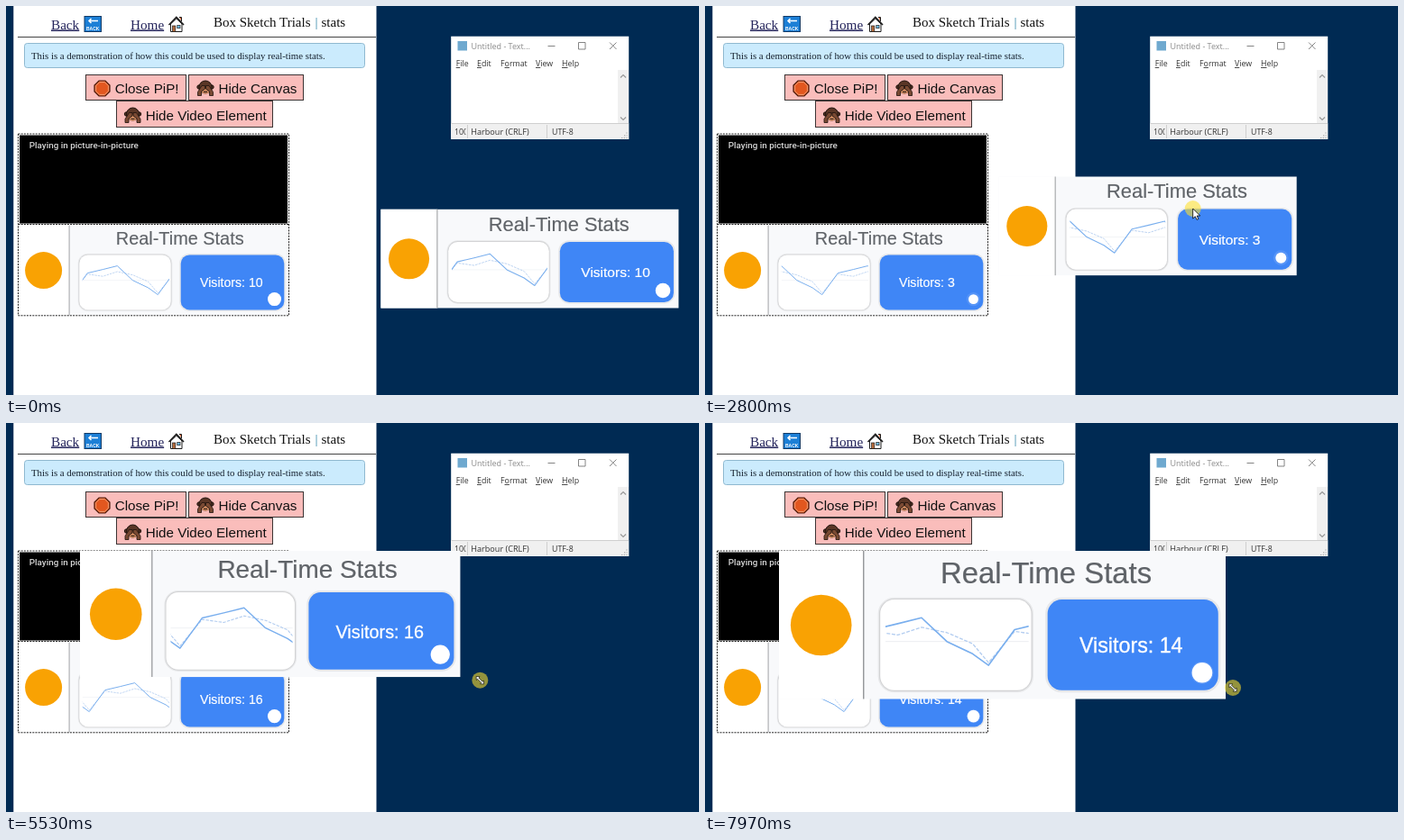
Write an HTML page that moves like this. It is 768 by 432 pixels and loops after 8 s.

```html
<!DOCTYPE html>
<html lang="en">
<head>
<meta charset="utf-8">
<title>Real-time stats</title>
<style>
  html, body { margin: 0; width: 100%; height: 100%; overflow: hidden; background: #002a53; }
  svg { display: block; width: 100%; height: 100%; }
  .serif { font-family: "Liberation Serif", serif; font-size: 15.2px; }
  .sans { font-family: "Liberation Sans", sans-serif; }
  .ui { font-family: "Open Sans", sans-serif; font-size: 8.8px; fill: #333; }
  .btn rect { fill: #fabdbb; stroke: #3c3434; }
  .btn text { font-size: 15.2px; fill: #111; }
  .dash { fill: none; stroke: #222; stroke-dasharray: 2 1.2; }
</style>
</head>
<body>
<svg viewBox="0 0 768 432" xmlns="http://www.w3.org/2000/svg">
  <defs>
    <clipPath id="plot"><rect x="71.5" y="35" width="96.2" height="56"/></clipPath>
    <clipPath id="count"><rect x="494" y="131" width="15.5" height="16"/></clipPath>

    <g id="panel">
      <rect width="300" height="99.7" fill="#f8f9fb"/>
      <rect width="57" height="99.7" fill="#fff"/>
      <path d="M56.8 0V99.7" stroke="#96989b" stroke-width=".9"/>
      <circle cx="28.3" cy="50" r="20.5" fill="#f9a203"/>
      <text class="sans" x="179.4" y="21.7" font-size="19.9" text-anchor="middle" fill="#5f6368" stroke="#5f6368" stroke-width=".15">Real-Time Stats</text>
      <g fill="none" stroke="#555">
        <rect x="68" y="32.8" width="101.4" height="61" rx="9.5" stroke-width="3" opacity=".1"/>
        <rect x="68" y="32.8" width="101.4" height="61" rx="9.5" stroke-width="1.4" opacity=".14"/>
        <rect x="180.4" y="32.8" width="114.6" height="61" rx="9.5" stroke-width="3" opacity=".1"/>
      </g>
      <rect x="68" y="32.8" width="101.4" height="61" rx="9.5" fill="#fff"/>
      <rect x="180.4" y="32.8" width="114.6" height="61" rx="9.5" fill="#3f86f6"/>
      <g clip-path="url(#plot)" fill="none" stroke-linejoin="round">
        <path d="M71 61H168" stroke="#eceef1" stroke-width=".6"/>
        <polyline id="past" stroke="#b3cdf0" stroke-width=".8" stroke-dasharray="2.4 1"/>
        <polyline id="live" stroke="#7aafee" stroke-width="1"/>
      </g>
      <text class="sans" id="visitors" x="201.8" y="68.7" font-size="14.1" fill="#fff" stroke="#fff" stroke-width=".22"></text>
      <circle cx="284.2" cy="82" r="7.6" fill="#fff" opacity=".12"/>
      <circle id="pulse" cx="284.2" cy="82" r="7" fill="#fff"/>
    </g>

    <g id="monkey">
      <g fill="#5a3626" stroke="#1f130e">
        <circle cx="-7" cy="-1" r="2.2"/><circle cx="7" cy="-1" r="2.2"/>
        <circle cy="-1" r="7"/>
      </g>
      <ellipse cy="3" rx="4.6" ry="3.4" fill="#cf8a60"/>
      <path d="M-2 4.4H2" stroke="#1f130e"/>
      <path d="M-8.5 8.5V4.5L-4 -2.5H-.5V1L-4.5 4V8.5ZM8.5 8.5V4.5L4 -2.5H.5V1L4.5 4V8.5Z" fill="#7a4a33" stroke="#1f130e" stroke-width=".8"/>
    </g>
  </defs>

  <rect width="768" height="432" fill="#002a53"/>
  <rect x="8.3" width="402.2" height="432" fill="#fff"/>

  <g class="serif" fill="#25255c">
    <text x="50" y="25.5" text-decoration="underline">Back</text>
    <text x="138" y="25.5" text-decoration="underline">Home</text>
    <text x="230" y="22.5" fill="#111" font-size="15">Box Sketch Trials</text>
    <text x="342.5" y="22.5" fill="#2f86a8">|</text>
    <text x="349.5" y="22.5" fill="#111" font-size="15">stats</text>
  </g>
  <g>
    <rect x="87" y="11.5" width="18.5" height="17" fill="#1c7fd6" stroke="#123a66"/>
    <path d="M92 16.5H102M94.5 14L92 16.5L94.5 19" fill="none" stroke="#fff" stroke-width="1.5"/>
    <text class="sans" x="96.2" y="26.5" font-size="5" font-weight="bold" text-anchor="middle" fill="#fff">BACK</text>
  </g>
  <g stroke="#1c1c1c">
    <path d="M182.5 20V28.5H195V20L188.8 14Z" fill="#fff"/>
    <path d="M192 12.5H194.5V17" fill="#d9683c"/>
    <path d="M180.5 21L188.8 12.5L197 21" fill="none" stroke-width="1.6"/>
    <rect x="184.6" y="22" width="3.2" height="6.5" fill="#b56a3a" stroke-width=".7"/>
    <rect x="189.8" y="21.5" width="3.2" height="3.2" fill="#6fc0ee" stroke-width=".7"/>
  </g>
  <path d="M13 34.5H410" stroke="#444"/>
  <rect x="20.5" y="41.5" width="377" height="27" rx="3" fill="#cbebfd" stroke="#8fb9d0"/>
  <text class="serif" x="28" y="59" style="font-size:10.8px" fill="#15202c">This is a demonstration of how this could be used to display real-time stats.</text>

  <g class="btn sans">
    <rect x="88.5" y="76.5" width="111" height="28"/>
    <rect x="202.5" y="76.5" width="127" height="28"/>
    <rect x="122.5" y="105.5" width="173" height="29"/>
    <text x="120.7" y="97">Close PiP!</text>
    <text x="235.5" y="97">Hide Canvas</text>
    <text x="154.7" y="127">Hide Video Element</text>
  </g>
  <path d="M103 83H110L115 88V95L110 100H103L98 95V88Z" fill="#e2571f" stroke="#4a1d10" stroke-width="1.2"/>
  <path d="M103.6 84.6H109.4L113.4 88.6V94.4L109.4 98.4H103.6L99.6 94.4V88.6Z" fill="none" stroke="#f6b08a" stroke-width=".8"/>
  <use href="#monkey" x="221" y="91"/>
  <use href="#monkey" x="140.5" y="121"/>

  <rect x="15" y="143.5" width="297" height="98" fill="#000"/>
  <text x="25.8" y="158.3" font-family="Roboto, sans-serif" font-size="9.85" font-weight="500" fill="#d6d6d6">Playing in picture-in-picture</text>
  <use href="#panel" transform="translate(13.3 243.6)"/>
  <path class="dash" d="M13.5 142H313.5V343.8H13.5ZM13.5 242.5H313.5"/>

  <g>
    <rect x="493.2" y="33.7" width="197" height="114.3" fill="#fff"/>
    <rect x="678" y="71" width="12" height="59" fill="#f0f0f0"/>
    <rect x="493.2" y="130" width="197" height="18" fill="#f0f0f0"/>
    <path d="M493.5 130.5H690M511.5 132V147M599.5 132V147" stroke="#cfcfcf"/>
    <rect x="500.5" y="39" width="10.5" height="10.5" fill="#6fa9cf"/>
    <path d="M600.5 44.5H608.5M634.5 40.5H642V48H634.5ZM669 40.5L676.5 48M676.5 40.5L669 48" fill="none" stroke="#777" stroke-width=".9"/>
    <path d="M681 79.5L684 76.5L687 79.5M681 123.5L684 126.5L687 123.5" fill="none" stroke="#999" stroke-width="1.2"/>
    <path d="M682 146.5H688.5M685 143.8H688.5M687.3 141H688.5" stroke="#aaa" stroke-width="1.2" stroke-dasharray="1.3 1.4"/>
    <g class="ui">
      <text x="515.5" y="48" fill="#8a8a8a" style="font-size:9px">Untitled - Text...</text>
      <text x="498.7" y="67"><tspan text-decoration="underline">F</tspan>ile</text>
      <text x="522" y="67"><tspan text-decoration="underline">E</tspan>dit</text>
      <text x="548" y="67">F<tspan text-decoration="underline">o</tspan>rmat</text>
      <text x="587" y="67"><tspan text-decoration="underline">V</tspan>iew</text>
      <text x="616" y="67"><tspan text-decoration="underline">H</tspan>elp</text>
      <text x="497" y="143" clip-path="url(#count)">100%</text>
      <text x="515.3" y="143" style="font-size:9.1px">Harbour (CRLF)</text>
      <text x="605" y="143">UTF-8</text>
    </g>
  </g>

  <use id="pip" href="#panel"/>

  <g id="cursor">
    <circle id="press" r="9" fill="#ffe02c" opacity=".58"/>
    <path id="arrow" d="M0 0V11L2.6 8.7L4.4 12.4L6.2 11.5L4.5 8H8Z" fill="#fff" stroke="#000" stroke-width=".8"/>
    <path id="sizer" d="M-8 0L-4 -3.6V-1.2H4V-3.6L8 0L4 3.6V1.2H-4V3.6Z" fill="#fff" stroke="#000" stroke-width=".8"/>
  </g>
</svg>
<script>
  const LOOP = 8000, STEP = 94.05, FIRST = 70;
  const $ = id => document.getElementById(id);
  const el = Object.fromEntries(
    ["past", "live", "visitors", "pulse", "pip", "cursor", "press", "arrow", "sizer"].map(id => [id, $(id)]));

  // Keys: time, x, y, width
  const PIP = [
    [1720, 415.4, 225.8, 330], [2140, 408, 224, 330], [2520, 326, 189.5, 330],
    [3400, 325, 189.5, 330], [3832, 270, 182, 330], [4200, 82, 142, 330],
    [5100, 82, 142, 330], [5890, 82, 142, 500], [6180, 82, 142, 625],
    [6700, 82, 142, 662], [7620, 82, 142, 662], [7970, 82, 142, 495]
  ];
  // Keys: time, x, y
  const POINTER = [
    [930, 645, 396], [1620, 632, 270], [2140, 624.5, 267.5], [2520, 541, 225],
    [3400, 540, 225], [3832, 485, 215.5], [4200, 297, 177], [4660, 411, 270],
    [5000, 418, 258], [5890, 600, 305], [6180, 725, 347], [6700, 741, 358.5],
    [7600, 742, 359], [7970, 585, 294]
  ];

  // Offsets from the peak over one cycle of the chart
  const CYCLE = 95.5, SPEED = 13.77 / 1000;
  const DX = [-33, -16, 0, 17, 34.3, 45];
  const LIVE = [53, 49, 45, 61, 69.3, 77];
  const PAST = [54.2, 56.6, 51.4, 55, 62.5, 75.2];
  const COUNTS = [10, 3, 16, 11, 14];

  function track(keys, t) {
    let i = 0;
    while (i < keys.length - 2 && t > keys[i + 1][0]) i++;
    const [a, b] = [keys[i], keys[i + 1]];
    const k = Math.min(1, Math.max(0, (t - a[0]) / (b[0] - a[0])));
    return a.slice(1).map((v, j) => v + (b[j + 1] - v) * k);
  }

  function series(ys, peak) {
    return [-1, 0, 1, 2].flatMap(n =>
      ys.map((y, i) => `${(peak + n * CYCLE + DX[i]).toFixed(2)},${y}`)).join(" ");
  }

  const show = (node, on) => node.setAttribute("visibility", on ? "visible" : "hidden");

  function draw(now) {
    const time = now % LOOP;
    const t = time < FIRST ? 0 : FIRST + Math.floor((time - FIRST) / STEP + 0.2) * STEP;

    const peak = 110 - SPEED * t;
    el.live.setAttribute("points", series(LIVE, peak));
    el.past.setAttribute("points", series(PAST, peak));
    el.visitors.textContent = "Visitors: " + COUNTS[Math.floor((t + 320) / 2000)];
    el.pulse.setAttribute("r", 6.5 + 1.05 * Math.cos(2 * Math.PI * (t / 1100 - 0.05)));

    const [x, y, w] = track(PIP, t);
    el.pip.setAttribute("transform", `translate(${x} ${y}) scale(${w / 300})`);

    const [cx, cy] = track(POINTER, t);
    const sizing = t > 4500, dragging = t > 1650 && t < 4230 || t > 4980;
    el.cursor.setAttribute("transform", `translate(${cx} ${cy})`);
    el.sizer.setAttribute("transform", t > 4980 ? "rotate(45) scale(.75)" : "");
    show(el.arrow, t > 720 && !sizing);
    show(el.sizer, sizing);
    show(el.press, dragging);
  }

  function tick(now) {
    draw(now);
    requestAnimationFrame(tick);
  }
  draw(0);
  requestAnimationFrame(tick);
</script>
</body>
</html>
```
